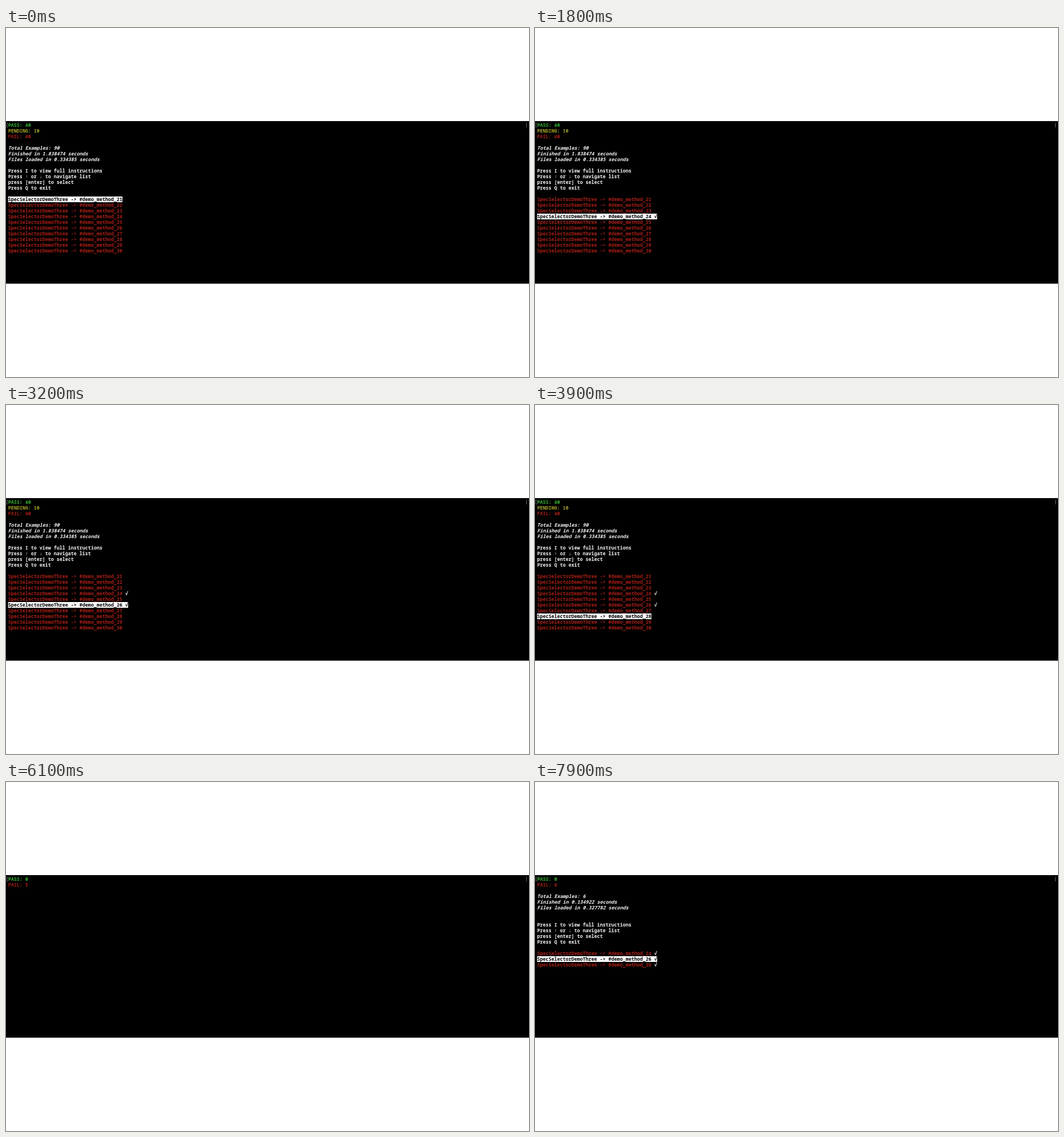
Recreate the animation shown at these times as an HTML page with a canvas. Size 917 by 611 pixels, loop 8000 ms.

```html
<!DOCTYPE html>
<html lang="en">
<head>
<meta charset="utf-8">
<title>Spec selector</title>
<style>
  html, body { margin: 0; width: 100%; height: 100%; overflow: hidden; background: #fff; }
  canvas { display: block; width: 917px; height: 611px; }
</style>
</head>
<body>
<canvas id="stage" width="917" height="611"></canvas>
<script>
const ctx = document.getElementById('stage').getContext('2d');
const LOOP = 8000, LEFT = 3.7, TOP = 170, LINE = 10, SIZE = 8.35, CELL = SIZE * 0.6;
const FONT = `${SIZE}px "Noto Sans Mono", "DejaVu Sans Mono", monospace`;
const COLOR = { pass: '#36b433', pending: '#a3a32b', fail: '#a91f17', text: '#f4f4f4' };
const LIST_ROW = 13;
const HELP = ['Press I to view full instructions', 'Press ↑ or ↓ to navigate list',
  'press [enter] to select', 'Press Q to exit'];

// Key presses: [time, selected method]
const MOVES = [[0, 21], [100, 22], [300, 23], [400, 24], [2300, 25], [2500, 26], [3700, 27], [3900, 28]];
const RERUN_MOVES = [[6200, 24], [7600, 26]];
const CHECKS = [[1800, 24], [3000, 26], [4500, 28]];
const FAILS = [[5900, 1], [6000, 3], [6100, 5], [6200, 6]];
const CLEAR = 5400, RERUN = 5900, DONE = 6200;

const latest = (steps, t) => steps.filter(([at]) => at <= t).pop()[1];

function write(text, row, color, style = '600', column = 0) {
  ctx.font = `${style} ${FONT}`;
  ctx.fillStyle = color;
  ctx.fillText(text, LEFT + column * CELL, TOP + row * LINE + 3);
}

function drawWindow() {
  ctx.fillStyle = '#fff';
  ctx.fillRect(0, 0, 917, 611);
  ctx.fillStyle = '#000';
  ctx.fillRect(0, 163, 917, 284.6);
  ctx.fillStyle = '#777';
  ctx.fillRect(1.5, 166, 0.8, 8);
  ctx.fillRect(1.5, 166, 1.6, 0.7);
  ctx.fillRect(1.5, 173.3, 1.6, 0.7);
  ctx.fillRect(912.2, 166, 0.9, 8);
}

function drawCounts(pass, pending, fail) {
  let row = 0;
  write(`PASS: ${pass}`, row++, COLOR.pass, 'bold');
  if (pending) write(`PENDING: ${pending}`, row++, COLOR.pending, 'bold');
  write(`FAIL: ${fail}`, row++, COLOR.fail, 'bold');
  return row + 1;
}

function drawSummary(row, total, finished, loaded) {
  [`Total Examples: ${total}`, `Finished in ${finished} seconds`, `Files loaded in ${loaded} seconds`]
    .forEach((line, i) => write(line, row + i, COLOR.text, 'italic 600'));
  HELP.forEach((line, i) => write(line, 8 + i, COLOR.text));
}

function drawList(methods, selected, checked) {
  const rowOf = i => LIST_ROW + i;
  const drawItem = (method, i) => {
    const active = method === selected, marked = checked.includes(method);
    const label = `SpecSelectorDemoThree -> #demo_method_${method}`;
    if (active) {
      ctx.fillStyle = '#fff';
      ctx.fillRect(LEFT, TOP + rowOf(i) * LINE - 5, (label.length + (marked ? 2 : 0)) * CELL, LINE);
    }
    write(label, rowOf(i), active ? '#000' : COLOR.fail, 'bold');
    if (marked) write('√', rowOf(i), active ? '#000' : COLOR.text, 'bold', label.length + 1);
  };
  methods.forEach(drawItem);
}

function render(t) {
  drawWindow();
  if (t < CLEAR) {
    const row = drawCounts(40, 10, 40);
    drawSummary(row, 90, '1.838474', '0.334385');
    const checked = CHECKS.filter(([at]) => at <= t).map(([, method]) => method);
    drawList(Array.from({ length: 10 }, (_, i) => 21 + i), latest(MOVES, t), checked);
  } else if (t >= RERUN) {
    const row = drawCounts(0, 0, latest(FAILS, t));
    if (t < DONE) return;
    drawSummary(row, 6, '0.134922', '0.327782');
    const methods = CHECKS.map(([, method]) => method);
    drawList(methods, latest(RERUN_MOVES, t), methods);
  }
}

const start = performance.now();
function tick() {
  render((performance.now() - start) % LOOP);
  requestAnimationFrame(tick);
}
tick();
</script>
</body>
</html>
```
